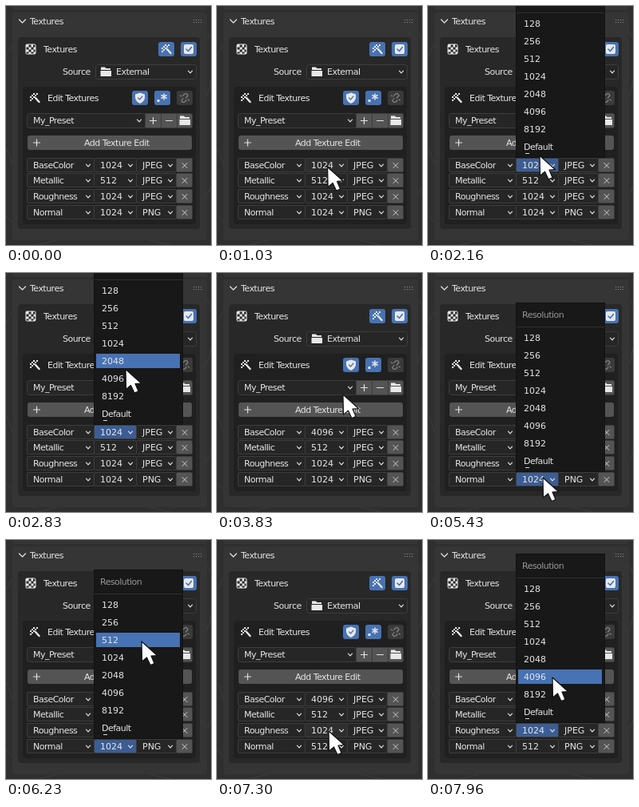
Recreate the animation shown at these times as an HTML page. Size 257 px wide and 299 px high, loop 8 s.

```html
<!DOCTYPE html>
<html lang="en">
<head>
<meta charset="utf-8">
<title>Texture resolution menu</title>
<style>
html, body { margin: 0; width: 100%; height: 100%; overflow: hidden; background: #2f2f2f; }
svg { display: block; width: 257px; height: 299px; }
text { font: 11px "DejaVu Sans", sans-serif; letter-spacing: -.52px; fill: #e6e6e6; }
.wide { letter-spacing: 0; }
.panel { fill: #353535; }
.box { fill: #282828; }
.inner { fill: #202020; }
.field { fill: #262626; stroke: #3d3d3d; }
.button { fill: #545454; stroke: #3d3d3d; }
.field.hover { fill: #2e2e2e; }
.button.hover { fill: #646464; }
.blue { fill: #4772b3; }
.field.open { fill: #3c5d93; }
.line { fill: none; stroke: #e2e2e2; stroke-width: 1.2; stroke-linecap: round; stroke-linejoin: round; }
.icon { fill: #e8e8e8; }
.wires { fill: none; stroke: #3b3b3b; }
#menu .back { fill: #181818; stroke: #111; }
#menu .title { fill: #989898; }
</style>
</head>
<body>
<svg viewBox="0 0 257 299">
  <defs>
    <path id="chevron" class="line" d="M-2.5-1.3 0 1.3 2.5-1.3"/>
    <path id="cross" class="line" d="M-3-3 3 3M3-3-3 3" style="stroke:#cfcfcf;stroke-width:1"/>
    <path id="folder" class="icon" d="M-6-6h5l1.5 1.5H6v2H-6ZM-6.500-1.500h13.500v7h-13.500Z"/>
    <g id="wand">
      <path class="icon" d="M-2-6h2v2h-2ZM2-6h2v2H2ZM-4-4h2v2h-2ZM0-4h2v2H0ZM-6-2h2v2h-2ZM-2-2h2v2h-2ZM-4 0h2v2h-2ZM-6 2h2v2h-2Z"/>
      <path d="M1 0 5.500 5" stroke="#e8e8e8" stroke-width="2.400" stroke-linecap="round"/>
    </g>
    <g id="checker">
      <rect x="-6.5" y="-6.5" width="13" height="13" rx="2" class="icon"/>
      <path fill="#282828" d="M-2.5-5.5h3v3h-3ZM3-5.5h2.5v3H3ZM-5.5-2.5h3v3h-3ZM.5-2.5H3.5v3H.5ZM-2.5.5h3v3h-3ZM3.5.5h2v3h-2ZM-5.5 3.5h3v2h-3ZM.5 3.5h3v2h-3Z"/>
    </g>
  </defs>

  <rect width="257" height="299" fill="#2f2f2f"/>
  <path class="wires" d="M0 62 8 48M0 178q5 8 8 22M0 262l8 9M252 32l5 9M252 113q4-9 5-20M252 236l5-10M40 299l24-6M180 293l26 6"/>
  <rect class="panel" x="8" y="-6" width="244" height="11" rx="3"/>
  <rect class="panel" x="8" y="8" width="244" height="285" rx="4"/>
  <path class="line" d="M16.5 17 20.5 21 24.5 17"/>
  <text x="30" y="23">Textures</text>
  <path d="M235 17.5h11M235 20.5h11" stroke="#8a8a8a" stroke-width="1.2" stroke-dasharray="1.2 1.8"/>

  <rect class="box" x="15" y="39" width="228" height="240" rx="4"/>
  <use href="#checker" x="31" y="54"/>
  <text x="47" y="58">Textures</text>
  <rect class="blue" x="191" y="45" width="20" height="18" rx="3"/>
  <use href="#wand" x="201" y="54"/>
  <rect class="blue" x="219" y="45" width="20" height="18" rx="3"/>
  <rect class="icon" x="223" y="48" width="12" height="12" rx="2"/>
  <path class="line" d="m226 54 2.500 2.500 4-5" style="stroke:#4772b3;stroke-width:1.6"/>
  <text x="71" y="86">Source</text>
  <rect class="field" x="112.500" y="73.500" width="126" height="18" rx="3"/>
  <use href="#folder" x="125" y="82.500"/>
  <text x="138" y="86">External</text>
  <use href="#chevron" x="231" y="82.500"/>

  <rect class="inner" x="21" y="101" width="217" height="172" rx="4"/>
  <use href="#wand" x="36" y="115"/>
  <text x="52" y="119">Edit Textures</text>
  <rect class="blue" x="158" y="106" width="20" height="18" rx="3"/>
  <path class="icon" d="M168 108.500 174 110.500V115q-1 5-6 7-5-2-6-7v-4.500Z"/>
  <path class="line" d="m165.500 115 2 2 3.500-4" style="stroke:#4772b3"/>
  <rect class="blue" x="186" y="106" width="20" height="18" rx="3"/>
  <rect class="icon" x="189.500" y="117" width="3" height="3"/>
  <path class="line" d="M198 110v7M195 111.700l6 3.600M201 111.700l-6 3.600" style="stroke-width:1.6"/>
  <rect x="214" y="106" width="20" height="18" rx="3" fill="#3a3a3a"/>
  <path class="line" d="m222 112 2-2q3-1.500 4 2l-2.500 3M226 118l-2 2q-3 1.500-4-2l2-2.500M218.500 112l1.500 1M229.500 118l-1.500-1" style="stroke:#858585"/>

  <rect class="field hot" x="26.500" y="134.500" width="148" height="18" rx="3"/>
  <text x="34" y="147">My_Preset</text>
  <use href="#chevron" x="167" y="143.500"/>
  <rect class="button hot" x="174.500" y="134.500" width="20" height="18"/>
  <rect class="button hot" x="194.500" y="134.500" width="20" height="18"/>
  <rect class="button hot" x="214.500" y="134.500" width="19" height="18" rx="2"/>
  <path class="line" d="M180.500 143.500h8M184.500 139.500v8M200.500 143.500h8"/>
  <use href="#folder" x="224" y="143.500"/>
  <rect class="button hot" x="27" y="162" width="206" height="18" rx="3" style="stroke:none"/>
  <path class="line" d="M34.500 171h8M38.500 167v8"/>
  <text x="98" y="175">Add Texture Edit</text>

  <g id="rows"></g>
  <g id="menu">
    <rect class="back" x="110.500" y=".5" width="111" height="211"/>
    <text class="title" x="118" y="19">Resolution</text>
    <path d="M111 30.500h110" stroke="#303030"/>
    <rect id="bar" class="blue" x="113" width="105" height="18"/>
    <g id="items"></g>
    <path d="M122 206.500h5" stroke="#d8d8d8"/>
  </g>
  <path id="cursor" fill="#fff" stroke="#111" stroke-width="1.200" stroke-linejoin="round"
    d="M0 0 .5 25 6.500 20 11 29.500 16 27.500 12 18 19.500 17.500Z"/>
</svg>
<script>
const $ = id => document.getElementById(id);
const LOOP = 8000, TICK = 1000 / 15;

const rows = [["BaseColor", "1024", "JPEG"], ["Metallic", "512", "JPEG"],
  ["Roughness", "1024", "JPEG"], ["Normal", "1024", "PNG"]];
const sizes = ["128", "256", "512", "1024", "2048", "4096", "8192", "Default"];
const rowTop = i => Math.floor(190 + 59 * i / 3);
const menuHeight = 212, firstItem = 44, itemGap = 22;

const cell = (x, y, w, kind) =>
  `<rect class="${kind} hot" x="${x + .5}" y="${y + .5}" width="${w}" height="17" rx="1.5"/>`;
const label = (x, y, s, kind = "") => `<text class="${kind}" x="${x}" y="${y}">${s}</text>`;
const icon = (name, x, y) => `<use href="#${name}" x="${x}" y="${y}"/>`;

$("rows").innerHTML = rows.map(([name, size, format], i) => {
  const y = rowTop(i), base = y + 13, mid = y + 9.5;
  return cell(26, y, 84, "field") + cell(110, y, 53, "field size") +
    cell(163, y, 50, "field") + cell(213, y, 20, "button") +
    label(34, base, name) + label(118, base, size, "wide value") + label(171, base, format, "wide") +
    [103, 156, 206].map(x => icon("chevron", x, mid)).join("") + icon("cross", 224, mid);
}).join("");
$("items").innerHTML = sizes.map((s, i) =>
  label(120, firstItem + 4 + itemGap * i, s, isNaN(s) ? "" : "wide")).join("");

const hot = [...document.querySelectorAll(".hot")];
const sizeCells = [...document.querySelectorAll(".size")];
const values = [...document.querySelectorAll(".value")];

const easeIn = k => k * k, easeOut = k => k * (2 - k), easeBoth = k => k * k * (3 - 2 * k);
// time, x, y, easing on the way there
const path = [
  [500, 27, 238], [1100, 140, 201, easeOut],
  [2100, 140, 201], [2166, 140, 187.5], [2500, 150, 113, easeOut],
  [2766, 150, 113], [2900, 150, 128],
  [3633, 150, 128], [3833, 158, 152, easeIn], [4366, 144, 262, easeOut],
  [5366, 144, 262], [5433, 144, 256], [5966, 168, 139, easeBoth],
  [6033, 168, 139], [6233, 170, 127],
  [6500, 170, 127], [7300, 140, 239, easeBoth],
  [7700, 140, 239], [7966, 156, 172, easeBoth]
];
const menus = [{ row: 0, from: 1230, to: 3300, pick: "4096" },
  { row: 3, from: 4830, to: 6360, pick: "512" },
  { row: 2, from: 7430, to: LOOP }];

function cursorAt(t) {
  const i = path.findIndex(p => p[0] > t);
  if (i < 0) return path[path.length - 1].slice(1, 3);
  const [t0, x0, y0] = path[Math.max(0, i - 1)];
  const [t1, x1, y1, ease = k => k] = path[i];
  const k = i ? ease((t - t0) / (t1 - t0)) : 0;
  return [x0 + (x1 - x0) * k, y0 + (y1 - y0) * k];
}

function inside(el, x, y) {
  const left = +el.getAttribute("x"), top = +el.getAttribute("y");
  return x >= left && x < left + +el.getAttribute("width") &&
    y >= top && y < top + +el.getAttribute("height") - .6;
}

function draw(t) {
  const tick = (Math.floor((t + 7) / TICK - .5) + .5) * TICK;
  const [x, y] = cursorAt(tick);
  const shown = t >= 500;
  $("cursor").setAttribute("visibility", shown ? "visible" : "hidden");
  $("cursor").setAttribute("transform", `translate(${x} ${y})`);

  const open = menus.find(m => t >= m.from && t < m.to);
  $("menu").setAttribute("visibility", open ? "visible" : "hidden");
  hot.forEach(el => el.classList.toggle("hover", shown && !open && inside(el, x, y)));
  sizeCells.forEach((el, i) => el.classList.toggle("open", !!open && open.row === i));
  values.forEach((el, i) => {
    const done = menus.find(m => m.row === i && m.pick && t >= m.to);
    el.textContent = done ? done.pick : rows[i][1];
  });

  let item = -1;
  if (open) {
    const top = rowTop(open.row) - menuHeight;
    $("menu").setAttribute("transform", `translate(0 ${top})`);
    item = Math.floor((y - top - firstItem) / itemGap + .5);
  }
  const lit = item >= 0 && item < sizes.length;
  $("bar").setAttribute("y", firstItem - 9 + itemGap * item);
  $("bar").setAttribute("opacity", lit ? 1 : 0);
}

const start = performance.now();
function frame() {
  draw((performance.now() - start) % LOOP);
  requestAnimationFrame(frame);
}
draw(0);
requestAnimationFrame(frame);
</script>
</body>
</html>
```
